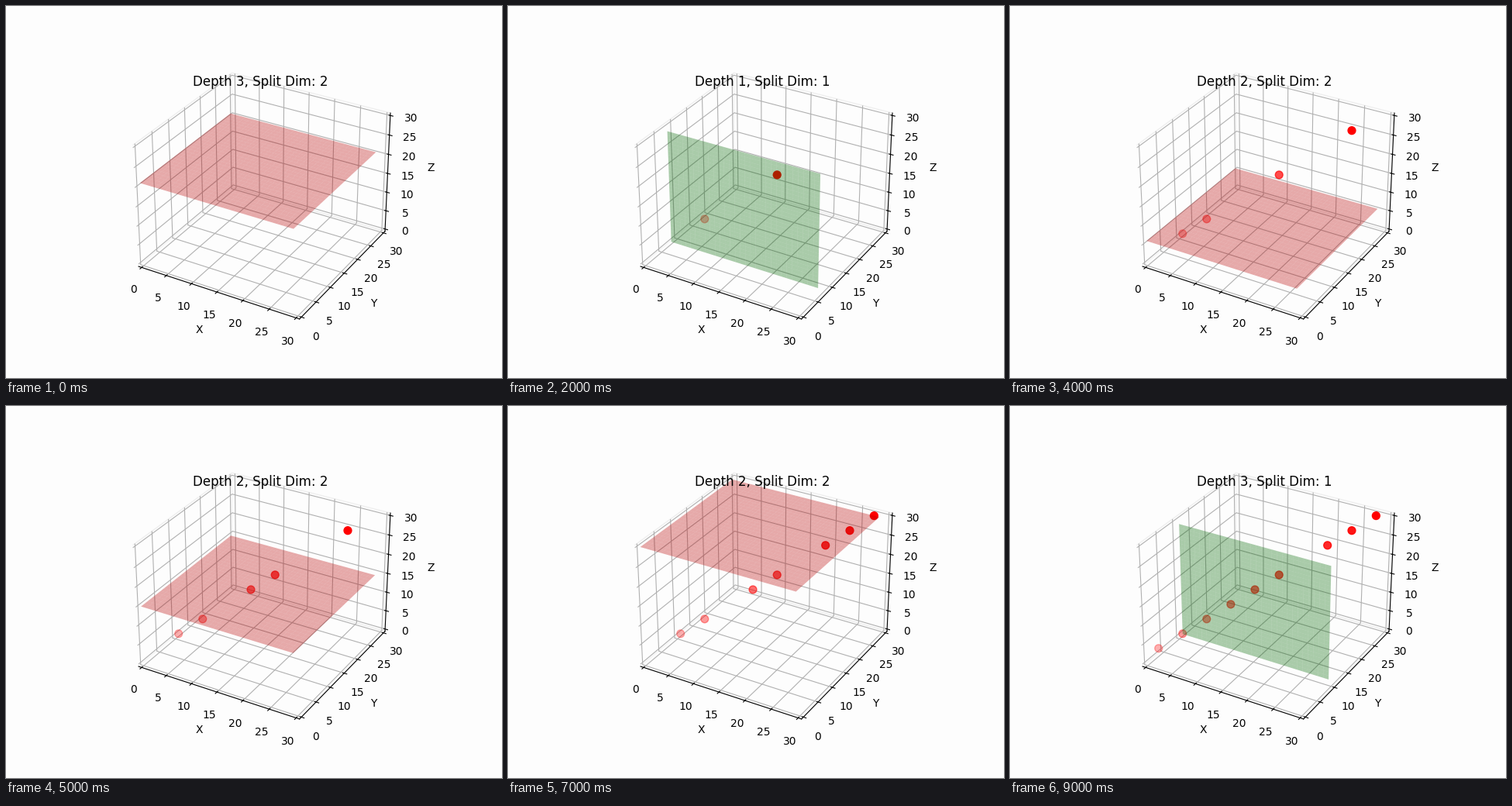
Recreate the animation shown at these times as a matplotlib script. Size 640 by 480 pixels, loop 10 s.

```python
import numpy as np
import matplotlib.pyplot as plt
from matplotlib.animation import FuncAnimation

BG = "#fdfdfd"
COLORS = [(0, 0, 0.42), (0, 0.4, 0), (0.72, 0, 0)]
POINTS = np.arange(1, 31).reshape(-1, 3)


def median_splits(count):
    """Yield (point index, depth, split dimension) of a balanced tree, row by row."""
    row, depth = [(0, count)], 0
    while row:
        children = []
        for slot, (lo, hi) in enumerate(row):
            mid = (lo + hi) // 2
            # rows below the third one cycle through the dimensions
            yield mid, depth, (depth if depth < 3 else slot % 3)
            children += [(lo, mid), (mid + 1, hi)]
        row = [(lo, hi) for lo, hi in children if lo < hi]
        depth += 1


steps = list(median_splits(len(POINTS)))

fig = plt.figure(figsize=(6.4, 4.8), dpi=100, facecolor=BG)
ax = fig.add_subplot(projection="3d", computed_zorder=False, facecolor=BG)
margin = 30 / 48
lim = (-margin, 30 + margin)
ax.set(xlabel="X", ylabel="Y", zlabel="Z")
for axis in (ax.xaxis, ax.yaxis, ax.zaxis):
    axis.pane.set(facecolor=BG, edgecolor="#efefef", alpha=1)

U, V = np.meshgrid(np.arange(30), np.arange(30))
drawn = []


def split_plane(dim, value):
    coords = [U, V]
    coords.insert(dim, np.full_like(U, value))
    return ax.plot_surface(*coords, color=COLORS[dim], alpha=0.33,
                           shade=False, zorder=3)


def update(frame):
    while drawn:
        drawn.pop().remove()
    # the loop opens on the last split, before any point is placed
    index, depth, dim = steps[frame - 1]
    placed = [step[0] for step in steps[:frame]]
    if placed:
        drawn.append(ax.scatter(*POINTS[placed].T, s=50, color="red", zorder=2))
    drawn.append(split_plane(dim, POINTS[index, dim]))
    ax.set(xlim=lim, ylim=lim, zlim=lim)
    ax.set_title(f"Depth {depth}, Split Dim: {dim}", y=0.928)
    return drawn


anim = FuncAnimation(fig, update, frames=len(steps), interval=1000, repeat=True)
plt.show()
```
